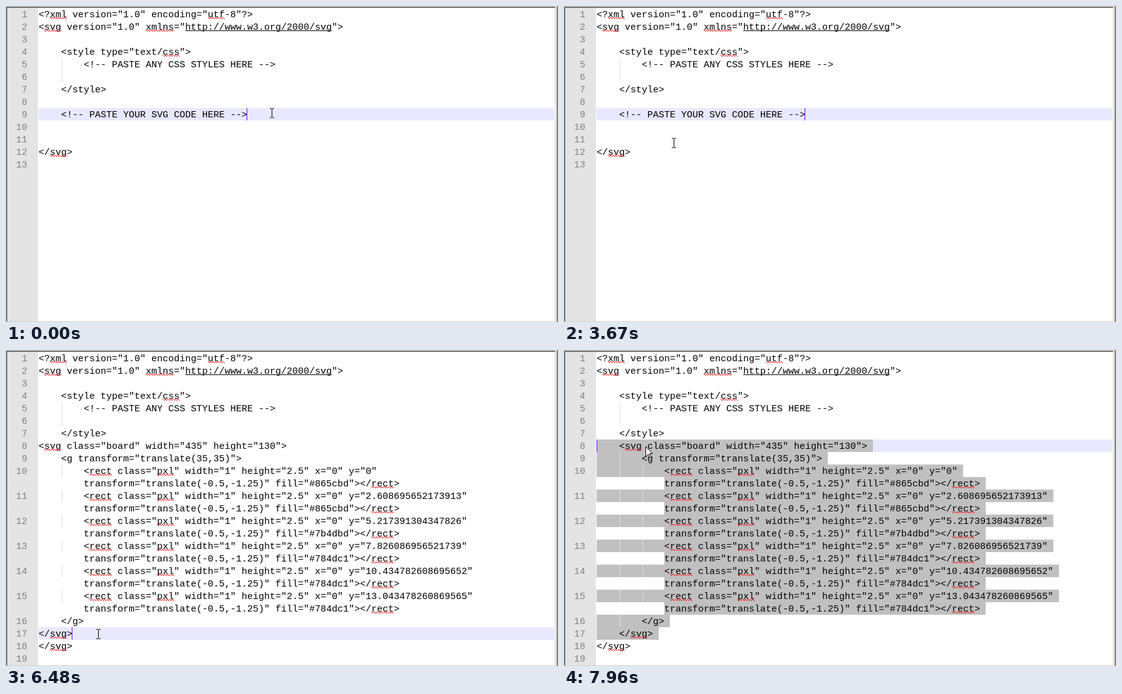
Recreate the animation shown at these times as an HTML page with a canvas. Size 881 by 505 pixels, loop 8000 ms.

```html
<!DOCTYPE html>
<html lang="en">
<head>
<meta charset="utf-8">
<style>
  html, body { margin: 0; width: 100%; height: 100%; overflow: hidden; background: #fff; }
  canvas { display: block; }
</style>
</head>
<body>
<canvas id="stage" width="881" height="505"></canvas>
<script>
const stage = document.getElementById('stage');
const ctx = stage.getContext('2d');
const { width: W, height: H } = stage;
const LOOP = 8000, LEFT = 52, RIGHT = 875, TOP = 3, CHAR = 9, ROW = 20;

// Document rows: a row starting with "transform" is the wrapped part of the line above.
const head = [
  '<?xml version="1.0" encoding="utf-8"?>',
  '<svg version="1.0" xmlns="http://www.w3.org/2000/svg">',
  '',
  '    <style type="text/css">',
  '        <!-- PASTE ANY CSS STYLES HERE -->',
  '        ',
  '    </style>'
];
const foot = ['</svg>', ''];
const fills = ['#865cbd', '#865cbd', '#7b4dbd', '#784dc1', '#784dc1', '#784dc1'];
const board = [
  '<svg class="board" width="435" height="130">',
  '    <g transform="translate(35,35)">',
  ...fills.flatMap((fill, i) => [
    `        <rect class="pxl" width="1" height="2.5" x="0" y="${i * 60 / 23}"`,
    `        transform="translate(-0.5,-1.25)" fill="${fill}"></rect>`
  ]),
  '    </g>',
  '</svg>'
];
const template = [...head, '    ', '    <!-- PASTE YOUR SVG CODE HERE -->', '    ', '', ...foot];
const pasted = [...head, ...board, ...foot];
const indented = [...head, ...board.map(row => '    ' + row), ...foot];
const pasteEnd = [head.length + board.length - 1, board.at(-1).length];

const home = { x: 424, y: 171 };
const moves = [
  { from: 300, to: 1110, x: 171, y: 172 },
  { from: 1380, to: 2010, x: 92, y: 172 },
  { from: 2300, to: 2440, x: 169, y: 225 },
  { from: 2600, to: 3060, x: 423, y: 169 },
  { from: 3060, to: 3600, x: 175, y: 219 },
  { from: 4000, to: 4640, x: 49, y: 155 },
  { from: 5800, to: 6330, x: 147, y: 454 },
  { from: 6640, to: 7170, x: 27, y: 162 },
  { from: 7680, to: 7960, x: 130, y: 154 }
];

// The mouse places the anchor at press and the caret up to release.
const states = [
  { at: 0, doc: template, press: 0, release: 0 },
  { at: 300, doc: template, press: 300, release: 2200 },
  { at: 3060, doc: template, press: 3060, release: 3060 },
  { at: 3740, doc: template, press: 3740, release: 3740 },
  { at: 4160, doc: template, press: 4160, release: 4790 },
  { at: 5130, doc: pasted, caret: pasteEnd },
  { at: 6640, doc: pasted, press: 6640, release: 7600 },
  { at: 7750, doc: indented, press: 6640, release: 7600, wholeLines: true }
];
const caretToggles = [120, 3060, 5310, 5560, 6640, 7170, 7380, 7750];

function mouseAt(t) {
  let { x, y } = home;
  for (const move of moves) {
    if (t < move.from) break;
    const k = Math.min(1, (t - move.from) / (move.to - move.from));
    const eased = 1 - (1 - k) ** 2;
    x += (move.x - x) * eased;
    y += (move.y - y) * eased;
  }
  return { x: Math.round(x), y: Math.round(y) };
}

function positionAt(t, doc) {
  const { x, y } = mouseAt(t);
  const row = Math.floor((y - TOP) / ROW);
  const col = Math.round((x - LEFT) / CHAR);
  return [row, Math.max(0, Math.min(col, doc[row].length))];
}

const isWrapped = row => /^ *transform/.test(row);
const indentOf = row => row.match(/^ */)[0].length;
const xOf = col => LEFT + col * CHAR;
const yOf = row => TOP + row * ROW;

function box(color, x, y, w, h) {
  ctx.fillStyle = color;
  ctx.fillRect(x, y, w, h);
}

function drawWindow() {
  box('#d4d0c8', 0, 0, W, H);
  box('#808080', 0, 1, RIGHT + 1, H - 2);
  box('#606060', 1, 2, RIGHT, H - 3);
  box('#fff', 2, TOP, RIGHT - 1, H - TOP - 1);
  box('#e4e4e4', 2, TOP, LEFT - 3, H - TOP - 1);
  box('#fff', RIGHT + 2, TOP, 1, H - TOP);
  box('#808080', W - 2, 0, 2, H);
}

function drawSelection(doc, [startRow, startCol], [endRow, endCol]) {
  for (let r = startRow; r <= endRow; r++) {
    const from = r === startRow ? startCol : isWrapped(doc[r]) ? indentOf(doc[r]) : 0;
    const to = r === endRow ? endCol : doc[r].length + 1;
    box('#c0c0c0', xOf(from), yOf(r), (to - from) * CHAR, ROW);
  }
}

function drawGuides(text, y) {
  for (let col = 4; col < indentOf(text); col += 4)
    for (let dy = 0; dy < ROW; dy++)
      box(dy % 2 ? '#c0c0c0' : '#fff', xOf(col) + 1, y + dy, 1, 1);
}

function drawRow(text, y, number) {
  const base = y + 15;
  if (number) {
    drawGuides(text, y);
    ctx.fillStyle = '#808080';
    ctx.textAlign = 'right';
    ctx.fillText(number, 34, base);
  }
  ctx.fillStyle = '#000';
  ctx.textAlign = 'left';
  ctx.fillText(text, LEFT, base);

  for (const url of text.matchAll(/http[^"]+/g))
    box('#000', xOf(url.index), base + 1, url[0].length * CHAR, 1);
  for (const word of text.matchAll(/(?<!2000\/)\b(xmlns|xml|utf|svg|css|pxl|rect)\b/g))
    for (let i = 0; i < word[0].length * CHAR; i++)
      box('#f00', xOf(word.index) + i, base + 2 - Math.abs(i % 4 - 2), 1, 1);
}

function drawBeam({ x, y }) {
  for (const serif of [y - 8, y + 7]) {
    box('#000', x - 3, serif, 3, 1);
    box('#000', x + 1, serif, 3, 1);
  }
  box('#000', x, y - 7, 1, 14);
}

const arrow = new Path2D('M0 0V16L4 12L7 18L9 17L6 11H11Z');

function drawArrow({ x, y }, direction) {
  ctx.save();
  ctx.translate(x + 0.5, y + 0.5);
  ctx.scale(direction, 1);
  ctx.fillStyle = '#fff';
  ctx.fill(arrow);
  ctx.strokeStyle = '#000';
  ctx.stroke(arrow);
  ctx.restore();
}

function drawMouse(t, { doc, release }) {
  const mouse = mouseAt(t);
  const dragging = t < release;
  const inMargin = mouse.x < LEFT;
  if (!dragging && (inMargin || doc === indented)) drawArrow(mouse, inMargin ? -1 : 1);
  else drawBeam(mouse);
}

function draw(t) {
  const state = states.findLast(s => s.at <= t);
  const { doc, press, release } = state;
  const caret = state.caret ?? positionAt(Math.min(t, release), doc);
  const anchor = state.caret ?? positionAt(press, doc);
  const end = state.wholeLines ? [anchor[0], doc[anchor[0]].length + 1] : anchor;

  drawWindow();
  box('#e8e8ff', LEFT, yOf(caret[0]), RIGHT - LEFT, ROW);
  drawSelection(doc, caret, end);

  ctx.font = '15px "Courier New", "Liberation Mono", monospace';
  let line = 0;
  doc.forEach((text, r) => drawRow(text, yOf(r), isWrapped(text) ? 0 : ++line));

  const caretOn = caretToggles.filter(time => time <= t).length % 2 === 0;
  if (caretOn) box('#8000ff', Math.max(LEFT, xOf(caret[1]) - 1), yOf(caret[0]), 1, ROW);
  drawMouse(t, state);
}

const start = performance.now();
function frame() {
  draw((performance.now() - start) % LOOP);
  requestAnimationFrame(frame);
}
frame();
</script>
</body>
</html>
```
